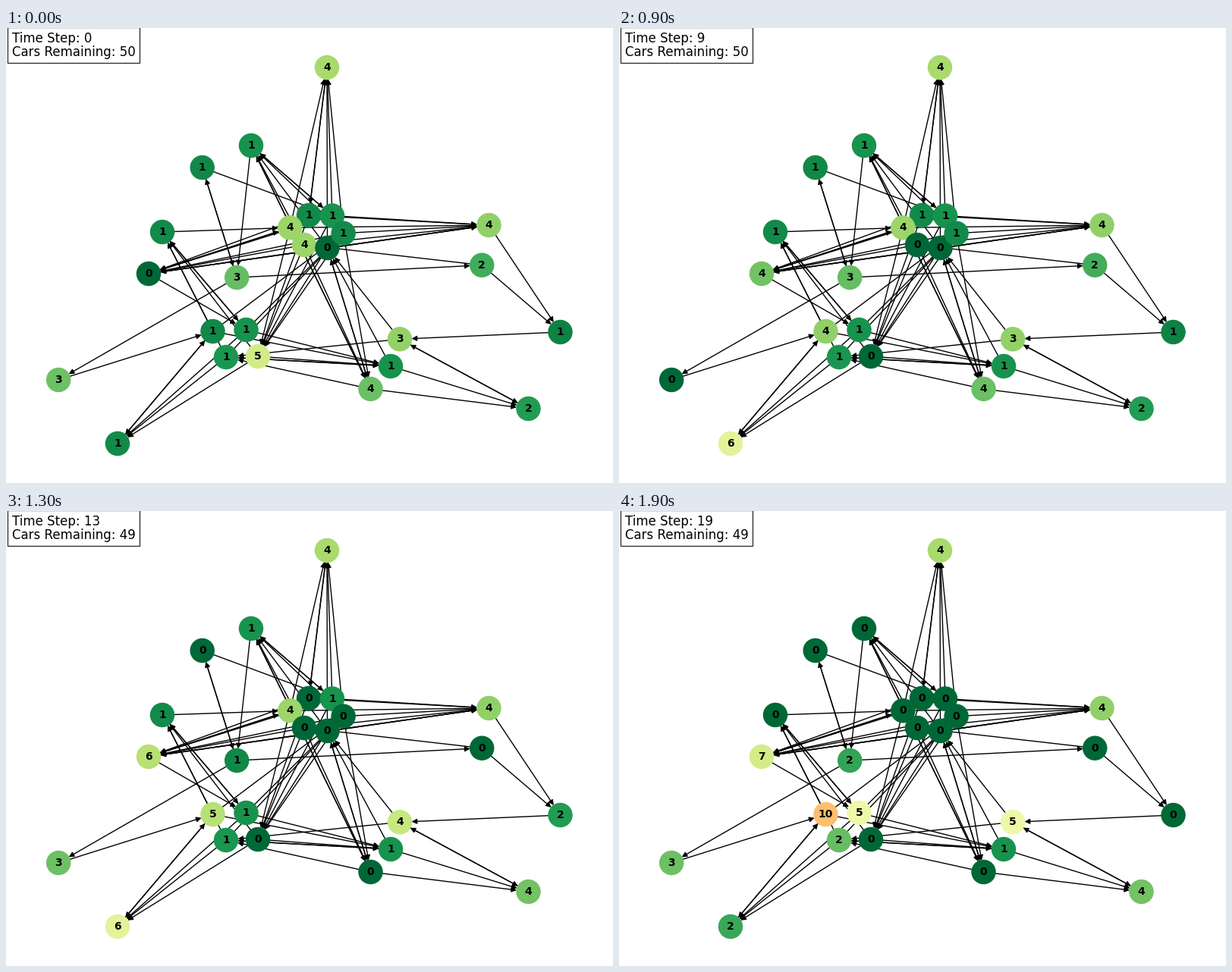
A matplotlib script that plays this animation: 800x600 px, repeating every 2 s.

```python
import math

import matplotlib.pyplot as plt
from matplotlib.animation import FuncAnimation
from matplotlib.patches import FancyArrowPatch

W, H, DPI = 800, 600, 100
STEPS, INTERVAL = 20, 100
NODE_SIZE = 500

# name: x, y, capacity, cars at the start
NODES = {
    "A": (423, 52, 13, 4), "B": (323, 155, 11, 1), "C": (258.7, 184, 15, 1),
    "D": (399, 247, 14, 1), "E": (430, 247.5, 11, 1), "F": (374.3, 263.3, 14, 4),
    "G": (393, 286, 14, 4), "I": (423.5, 290, 14, 0), "H": (444.6, 270.7, 14, 1),
    "J": (636.5, 260, 15, 4), "K": (627.2, 312.7, 13, 2), "L": (730.5, 401, 18, 1),
    "M": (519, 410.3, 11, 3), "N": (507, 446, 11, 1), "O": (480.5, 476, 19, 4),
    "P": (688.5, 502, 18, 2), "R": (316.5, 398, 11, 1), "S": (290, 434, 10, 1),
    "Q": (332, 433, 13, 5), "T": (272.5, 400, 15, 1), "U": (147, 548, 14, 1),
    "V": (69.2, 464, 14, 3), "W": (188, 324, 18, 0), "X": (206, 269, 14, 1),
    "Y": (304.2, 329, 15, 3),
}

# each road leads from the first letter to every following one
ROADS = (
    "AD BEYO CYE DAJWQ EBAJWQ FWJAQ GWJOQB HABJOWQ IBAJOQW JLW KLG LM "
    "MPSI NPSI OPSIB PM QUXN RXNUH SUXNH TUXNH UT VT WFRJ XFR YCVK"
).split()

# step, from, to (None leaves the network), cars
MOVES = [
    (3, "G", "W", 4),
    (8, "Q", "U", 5), (9, "V", "T", 3),
    (10, "Y", "V", 3), (10, "L", "M", 1), (10, "D", "W", 1), (10, "U", "T", 1),
    (11, "C", "Y", 1), (11, "K", "L", 2), (11, "P", "M", 2),
    (11, "H", "W", 1), (11, "S", "U", 1),
    (13, "O", "P", 4), (13, "M", "S", 1), (13, "M", None, 1),
    (14, "M", "S", 1), (15, "E", "W", 1), (16, "X", "R", 1), (16, "R", "U", 1),
    (18, "U", "T", 5), (18, "B", "Y", 1),
    (19, "L", "M", 2), (19, "F", "W", 4), (19, "W", "R", 4),
]
TOTAL = 50


def state(step):
    """Cars per node and cars left in the network at a step."""
    cars = {name: node[3] for name, node in NODES.items()}
    left = TOTAL
    for when, src, dst, n in MOVES:
        if when > step:
            continue
        cars[src] -= n
        if dst is None:
            left -= n
        else:
            cars[dst] += n
    return cars, left


fig = plt.figure(figsize=(W / DPI, H / DPI), dpi=DPI, facecolor="white")
ax = fig.add_axes([0, 0, 1, 1])
ax.set_xlim(0, W)
ax.set_ylim(H, 0)
ax.axis("off")

shrink = math.sqrt(NODE_SIZE) / 2
for road in ROADS:
    for end in road[1:]:
        ax.add_patch(FancyArrowPatch(
            NODES[road[0]][:2], NODES[end][:2], arrowstyle="-|>",
            shrinkA=shrink, shrinkB=shrink, mutation_scale=10,
            color="black", linewidth=1, zorder=1))

xs, ys, caps, _ = zip(*NODES.values())
dots = ax.scatter(xs, ys, s=NODE_SIZE, linewidths=1, zorder=2)
labels = {
    name: ax.text(node[0], node[1], "", ha="center", va="center",
                  size=10, weight="bold", family="DejaVu Sans", zorder=4)
    for name, node in NODES.items()
}
info = ax.text(0.01, 0.992, "", transform=ax.transAxes, va="top", size=12,
               family="DejaVu Sans", linespacing=1.0, zorder=5,
               bbox=dict(facecolor="white", edgecolor="black", alpha=0.8))
cmap = plt.get_cmap("RdYlGn_r")


def draw(step):
    cars, left = state(step)
    colors = [cmap(n / cap) for n, cap in zip(cars.values(), caps)]
    dots.set_facecolor(colors)
    dots.set_edgecolor(colors)
    for name, n in cars.items():
        labels[name].set_text(str(n))
    info.set_text(f"Time Step: {step}\nCars Remaining: {left}")
    return [dots, info, *labels.values()]


anim = FuncAnimation(fig, draw, frames=STEPS, interval=INTERVAL,
                     init_func=lambda: draw(0), repeat=True, repeat_delay=0)
plt.show()
```
